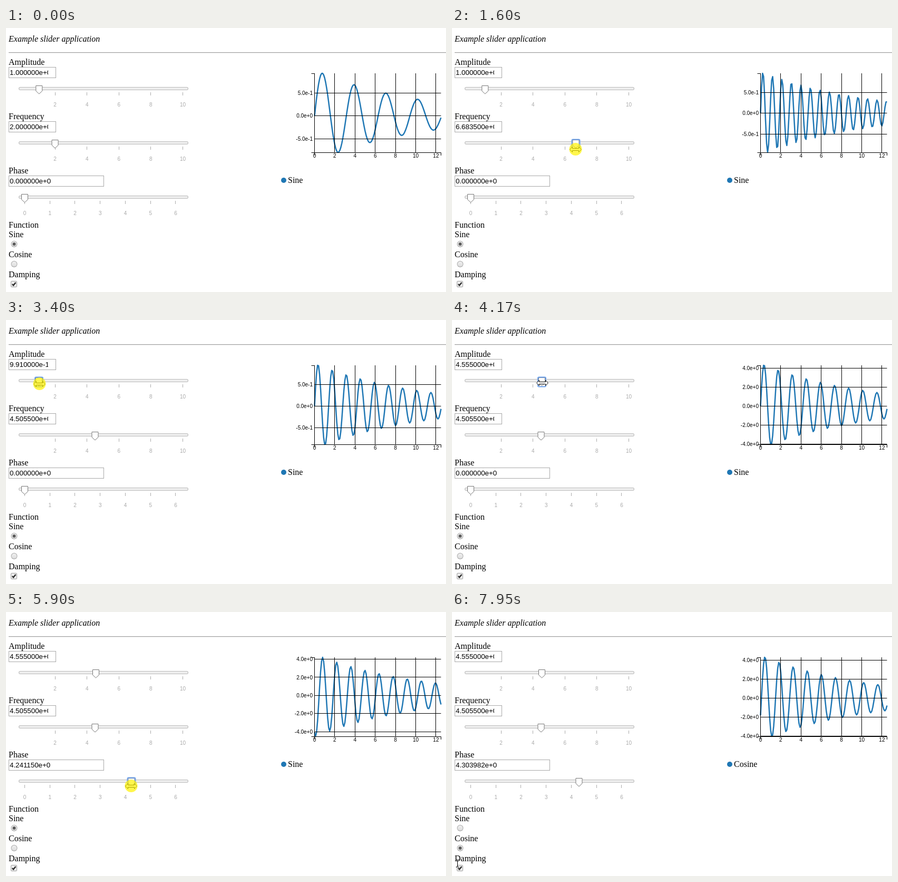
These frames come from a looping animation (835 px wide and 501 px high, 8 s). An HTML page with a canvas:

```html
<!DOCTYPE html>
<html lang="en">
<head>
<meta charset="utf-8">
<title>Example slider application</title>
<style>
html, body { margin: 0; width: 100%; height: 100%; overflow: hidden; background: #fff; }
canvas { display: block; }
</style>
</head>
<body>
<canvas id="stage" width="835" height="501"></canvas>
<script>
const ctx = document.getElementById('stage').getContext('2d');
const LOOP = 8000;
const SERIF = '"Liberation Serif", "Times New Roman", serif';
const SANS = '"Liberation Sans", Arial, sans-serif';
const BLUE = '#1f77b4';

// Bursts of screen updates: first, last, count
const bursts = [
  [70, 350, 5], [520, 670, 3], [920, 1600, 10], [1930, 2310, 6], [2460, 2690, 4],
  [2840, 3150, 5], [3400, 4170, 11], [4250, 4880, 9], [5040, 5820, 11],
  [5900, 5980, 2], [6130, 6840, 10], [7010, 7260, 4], [7410, 7410, 1], [7870, 7950, 2]
];

// Slider positions as [time, fraction of the range]
const ampKeys = [[3400, 0.09], [3480, 0.105], [4090, 0.45]];
const freqKeys = [[920, 0.205], [1600, 0.665], [1854, 0.665], [2234, 0.445]];
const phaseKeys = [[4960, 0], [5040, 0.03], [5350, 0.265], [5820, 0.655], [5900, 0.675], [5980, 0.685]];

// Pointer as [time, x, y, shape]
const pointer = [
  [70, 699, 459, 'arrow'], [350, 123, 239, 'arrow'], [600, 105, 232, 'arrow'], [670, 96, 225, 'resize'],
  [920, 97, 227, 'resize'], [1600, 234, 230, 'resize'], [1854, 234, 230, 'resize'], [2234, 169, 230, 'resize'],
  [2310, 168, 229, 'arrow'], [2690, 54, 144, 'arrow'], [2990, 68, 132, 'arrow'], [3150, 62, 122, 'resize'],
  [3400, 63, 121, 'resize'], [3480, 67, 120, 'resize'], [4090, 171, 119, 'resize'], [4170, 171, 119, 'resize'],
  [4250, 160, 135, 'arrow'], [4650, 4, 352, 'arrow'], [4880, 36, 325, 'resize'], [5040, 44, 325, 'resize'],
  [5350, 114, 325, 'resize'], [5820, 232, 330, 'resize'], [5900, 237, 330, 'resize'], [5980, 241, 330, 'resize'],
  [6130, 241, 330, 'arrow'], [6620, 3, 425, 'arrow'], [6840, 15, 439, 'arrow'], [7010, 16, 445, 'arrow'],
  [7410, 16, 445, 'arrow'], [7870, 13, 456, 'arrow'], [7950, 10, 477, 'text']
];
const presses = [[920, 2310], [3400, 4170], [5040, 6130], [7010, 7260]];

const within = (t, a, b) => t >= a && t < b;

function lastUpdate(t) {
  let q = 0;
  for (const [a, b, n] of bursts) {
    if (t < a) break;
    const gap = n > 1 ? (b - a) / (n - 1) : 1;
    q = t >= b ? b : a + Math.floor((t - a) / gap + 0.1) * gap;
  }
  return q;
}

function track(keys, t, col = 1) {
  let i = 0;
  while (i < keys.length && keys[i][0] <= t) i++;
  if (i === 0) return keys[0][col];
  if (i === keys.length) return keys[i - 1][col];
  const a = keys[i - 1], b = keys[i];
  return a[col] + (b[col] - a[col]) * (t - a[0]) / (b[0] - a[0]);
}

const snap = f => Math.round(f * 200) / 200;

function text(s, x, y, font, color = '#000', align = 'left') {
  ctx.font = font;
  ctx.fillStyle = color;
  ctx.textAlign = align;
  ctx.fillText(s, x, y);
}
const label = (s, x, y) => text(s, x, y, '16px ' + SERIF);

function line(x1, y1, x2, y2, color, width = 1) {
  ctx.strokeStyle = color;
  ctx.lineWidth = width;
  ctx.beginPath();
  ctx.moveTo(x1, y1);
  ctx.lineTo(x2, y2);
  ctx.stroke();
}

function disc(x, y, r, color) {
  ctx.fillStyle = color;
  ctx.beginPath();
  ctx.arc(x, y, r, 0, 7);
  ctx.fill();
}

function shape(points, fill, stroke) {
  ctx.beginPath();
  points.forEach(([x, y]) => ctx.lineTo(x, y));
  ctx.closePath();
  ctx.fillStyle = fill;
  ctx.fill();
  ctx.strokeStyle = stroke;
  ctx.lineWidth = 1;
  ctx.stroke();
}

function slider(s) {
  const y = s.y + 59;
  label(s.name, 5, s.y + 14);
  ctx.strokeStyle = '#a9a9a9';
  ctx.lineWidth = 1;
  ctx.strokeRect(5.5, s.y + 18.5, s.width - 1, 20);
  ctx.save();
  ctx.beginPath();
  ctx.rect(7, s.y + 19, s.width - 17, 19);
  ctx.clip();
  text(s.value.toExponential(6), 7, s.y + 33, '13.333px ' + SANS);
  ctx.restore();

  ctx.lineCap = 'round';
  line(27, y, 343, y, '#bbb', 6);
  line(27, y, 343, y, '#eee', 4);
  ctx.lineCap = 'butt';
  for (let v = s.first; v <= s.max; v += s.step) {
    const x = 35 + 300 * (v - s.min) / (s.max - s.min);
    const px = Math.round(x) + 0.5;
    line(px, y + 7, px, y + 13, '#aaa');
    text(v, x + 0.5, y + 34, '10px ' + SANS, '#aaa', 'center');
  }

  const hx = 35 + 300 * s.frac;
  shape([[-5.5, -5.5], [-5.5, 4.5], [0.5, 10], [6.5, 4.5], [6.5, -5.5]]
    .map(p => [hx + p[0], y + p[1]]), '#fff', '#777');
  if (s.focus) {
    ctx.strokeStyle = '#6ea2ec';
    ctx.lineWidth = 2;
    ctx.beginPath();
    ctx.roundRect(hx - 7, y - 6.5, 15, 18, 2);
    ctx.stroke();
  }
}

function radio(x, y, on) {
  const g = ctx.createLinearGradient(0, y - 6, 0, y + 6);
  g.addColorStop(0, '#f2f2f2');
  g.addColorStop(1, '#dadada');
  disc(x, y, 6, '#a2a2a2');
  disc(x, y, 5.1, g);
  if (on) disc(x, y, 3, '#5c5c5c');
}

function checkbox(x, y) {
  ctx.fillStyle = '#ececec';
  ctx.strokeStyle = '#a0a0a0';
  ctx.lineWidth = 1;
  ctx.beginPath();
  ctx.roundRect(x + 0.5, y + 0.5, 11, 11, 1.5);
  ctx.fill();
  ctx.stroke();
  ctx.strokeStyle = '#2a2a2a';
  ctx.lineWidth = 2.4;
  ctx.beginPath();
  ctx.moveTo(x + 2.8, y + 6);
  ctx.lineTo(x + 5, y + 8.4);
  ctx.lineTo(x + 9.4, y + 3);
  ctx.stroke();
}

function tickStep(span, count) {
  const base = 10 ** Math.floor(Math.log10(span / count));
  const err = count / span * base;
  return base * (err <= 0.15 ? 10 : err <= 0.35 ? 5 : err <= 0.75 ? 2 : 1);
}

function chart(amp, freq, phase, wave) {
  const left = 585.5, right = 825.5, top = 86, bottom = 236;
  const data = Array.from({ length: 126 }, (_, i) =>
    amp * wave(freq * i / 10 + phase) * Math.exp(-i / 100));
  const hi = Math.max(...data), lo = Math.min(...data);
  const sx = x => left + x * (right - left) / 12.5;
  const sy = v => top + (hi - v) / (hi - lo) * (bottom - top);

  ctx.strokeStyle = BLUE;
  ctx.lineWidth = 2.5;
  ctx.lineJoin = 'round';
  ctx.beginPath();
  data.forEach((v, i) => ctx.lineTo(sx(i / 10), sy(v)));
  ctx.stroke();
  ctx.lineJoin = 'miter';

  const font = '10px ' + SANS;
  for (let x = 0; x <= 12; x += 2) {
    const px = Math.floor(sx(x)) + 0.5;
    line(px, top, px, bottom, '#000');
    text(x, sx(x), 246, font, '#000', 'center');
  }
  const step = tickStep(hi - lo, 4);
  for (let k = Math.ceil(lo / step); k <= hi / step; k++) {
    const v = k * step || 0, py = Math.floor(sy(v)) + 0.5;
    line(left, py, right, py, '#000');
    text(v.toExponential(1), 582, sy(v) + 3.6, font, '#000', 'right');
  }

  ctx.strokeStyle = '#000';
  ctx.lineWidth = 1;
  ctx.beginPath();
  ctx.moveTo(left - 6, top + 0.5);
  ctx.lineTo(left, top + 0.5);
  ctx.lineTo(left, bottom + 0.5);
  ctx.lineTo(left - 6, bottom + 0.5);
  ctx.moveTo(left, bottom + 6);
  ctx.lineTo(left, bottom + 0.5);
  ctx.lineTo(right, bottom + 0.5);
  ctx.lineTo(right, bottom + 6);
  ctx.stroke();
}

function drawPointer(t) {
  if (t < pointer[0][0]) return;
  const x = Math.round(track(pointer, t)), y = Math.round(track(pointer, t, 2));
  const kind = pointer.filter(k => k[0] <= t).pop()[3];
  ctx.save();
  ctx.translate(x + 0.5, y + 0.5);
  if (kind === 'arrow') {
    shape([[0, 0], [0, 16], [3.5, 12.6], [6, 18], [8.4, 17], [6, 11.6], [11, 11.4]], '#fff', '#000');
  } else if (kind === 'resize') {
    shape([[-11, 0], [-6, -5], [-6, -2], [6, -2], [6, -5], [11, 0],
      [6, 5], [6, 2], [-6, 2], [-6, 5]], '#fff', '#000');
  } else {
    line(0, -7, 0, 6, '#000');
    line(-3, -7.5, -0.5, -7.5, '#000');
    line(0.5, -7.5, 3, -7.5, '#000');
    line(-3, 6.5, -0.5, 6.5, '#000');
    line(0.5, 6.5, 3, 6.5, '#000');
  }
  ctx.restore();
  if (presses.some(([a, b]) => within(t, a, b))) {
    const radioClick = t >= 7010;
    ctx.save();
    ctx.globalAlpha = 0.7;
    disc(x + 0.5, radioClick ? 453 : y, 12, '#fff200');
    ctx.restore();
  }
}

function draw(now) {
  const t = lastUpdate(now % LOOP);
  ctx.fillStyle = '#fff';
  ctx.fillRect(0, 0, 835, 501);

  text('Example slider application', 5, 26, 'italic 16px ' + SERIF);
  line(5, 46.5, 835, 46.5, '#9a9a9a');
  line(5, 47.5, 835, 47.5, '#eee');

  const aFrac = t < 3400 ? 0.9 / 9.9 : snap(track(ampKeys, t));
  const fFrac = t < 920 ? 1.9 / 9.9 : snap(track(freqKeys, t));
  const pFrac = snap(track(phaseKeys, t));
  const amp = 0.1 + 9.9 * aFrac, freq = 0.1 + 9.9 * fFrac, phase = 2 * Math.PI * pFrac;
  const scale = { min: 0.1, max: 10, first: 2, step: 2, width: 90 };

  slider({ ...scale, name: 'Amplitude', y: 56, frac: aFrac, value: amp, focus: within(t, 3400, 5040) });
  slider({ ...scale, name: 'Frequency', y: 159, frac: fFrac, value: freq, focus: within(t, 920, 3400) });
  slider({ name: 'Phase', y: 262, min: 0, max: 2 * Math.PI, first: 0, step: 1, width: 181,
    frac: pFrac, value: phase, focus: within(t, 5040, 7010) });

  const cosine = t >= 7410;
  label('Function', 5, 379);
  label('Sine', 5, 397);
  radio(15.5, 410, !cosine);
  label('Cosine', 5, 435);
  radio(15.5, 448, cosine);
  label('Damping', 5, 473);
  checkbox(9, 480);

  chart(amp, freq, phase, cosine ? Math.cos : Math.sin);
  disc(527, 289, 5, BLUE);
  label(cosine ? 'Cosine' : 'Sine', 535, 294);

  drawPointer(t);
}

const start = performance.now();
function tick() {
  draw(performance.now() - start);
  requestAnimationFrame(tick);
}
tick();
</script>
</body>
</html>
```
